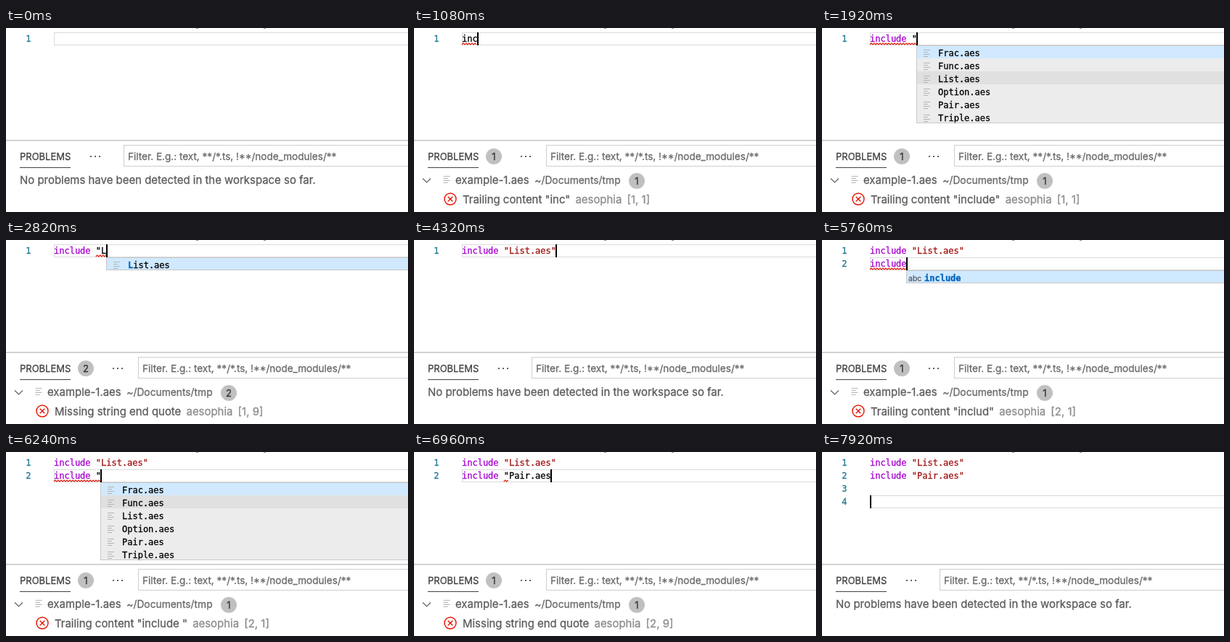
These frames come from a looping animation (554 px wide and 255 px high, 8 s). An HTML page with a canvas:

```html
<!DOCTYPE html>
<html lang="en">
<head>
<meta charset="utf-8">
<title>Editor with include completion</title>
<style>
  html, body { margin: 0; width: 100%; height: 100%; overflow: hidden; background: #fff; }
  canvas { display: block; width: 554px; height: 255px; }
</style>
</head>
<body>
<canvas id="stage"></canvas>
<script>
const WIDTH = 554, HEIGHT = 255, LOOP = 8000;
const LEFT = 66, TOP = 6, ROW = 18, CHAR = 7.22;
const MONO = '12px "DejaVu Sans Mono", monospace';
const UI = 'Inter, sans-serif';
const FILES = ['Frac.aes', 'Func.aes', 'List.aes', 'Option.aes', 'Pair.aes', 'Triple.aes'];
const FIRST = 'include "List.aes"', SECOND = 'include "Pair.aes"';

const canvas = document.getElementById('stage');
const ctx = canvas.getContext('2d');
const ratio = window.devicePixelRatio || 1;
canvas.width = WIDTH * ratio;
canvas.height = HEIGHT * ratio;

// State changes: each helper returns the part of the state it replaces.
const type = (...lines) => ({ lines });
const second = text => type(FIRST, text);
const files = typed => ({ popup: { typed, items: FILES.filter(name => name.startsWith(typed)) } });
const word = typed => ({ popup: { typed, items: ['include'], isWord: true } });
const closed = { popup: null };
const trailing = (text, line) =>
  ({ problem: `Trailing content "${text}"`, place: `[${line}, 1]`, count: 1, line, from: 0, to: 99 });
const missingQuote = line => ({ problem: 'Missing string end quote', place: `[${line}, 9]`, count: 2, line });
const onlyQuote = { count: 1, to: 9 };
const solved = { problem: null };

const events = [
  [-520, type(''), closed, solved],
  [720, type('i')],
  [780, trailing('i', 1)],
  [900, type('inc')],
  [1080, trailing('inc', 1)],
  [1140, type('incl')],
  [1200, trailing('incl', 1)],
  [1260, type('inclu')],
  [1380, trailing('inclu', 1)],
  [1440, type('includ')],
  [1500, trailing('includ', 1)],
  [1560, type('include')],
  [1680, trailing('include', 1)],
  [1800, type('include ')],
  [1920, type('include "'), files('')],
  [1980, missingQuote(1)],
  [2340, { from: 8 }],
  [2820, type('include "L'), files('L')],
  [3120, type('include "Li'), files('Li')],
  [3240, type('include "List.aes'), closed],
  [3540, onlyQuote],
  [4140, type(FIRST)],
  [4260, solved],
  [4440, second('')],
  [4740, second('i')],
  [4800, word('i')],
  [4860, trailing('i', 2)],
  [4920, second('in'), word('in')],
  [5040, trailing('in', 2)],
  [5100, second('inc'), word('inc')],
  [5160, trailing('inc', 2)],
  [5220, second('incl'), word('incl')],
  [5340, trailing('incl', 2)],
  [5400, second('inclu'), word('inclu')],
  [5460, trailing('inclu', 2)],
  [5520, second('includ'), word('includ')],
  [5580, trailing('includ', 2)],
  [5700, second('include'), word('include')],
  [5820, trailing('include', 2)],
  [5940, second('include '), closed],
  [6060, trailing('include ', 2)],
  [6180, second('include "')],
  [6240, files('')],
  [6300, missingQuote(2)],
  [6360, { from: 8 }],
  [6420, second('include "P'), files('P')],
  [6720, second('include "Pair.aes'), closed],
  [6900, onlyQuote],
  [7200, second(SECOND)],
  [7320, solved],
  [7620, type(FIRST, SECOND, '')],
  [7800, type(FIRST, SECOND, '', '')],
];

function stateAt(time) {
  const state = {};
  for (const [start, ...changes] of events) {
    if (start > time) break;
    Object.assign(state, ...changes);
    if (changes.some(change => change.lines)) state.edited = start;
  }
  return state;
}

// A hairline outline gives the glyphs a slightly heavier weight.
function text(string, x, y, color, font, align = 'left') {
  ctx.font = font;
  ctx.fillStyle = ctx.strokeStyle = color;
  ctx.lineWidth = .3;
  ctx.textAlign = align;
  ctx.fillText(string, x, y);
  ctx.strokeText(string, x, y);
  return ctx.measureText(string).width;
}

const label = (string, x, y, color = '#5c5c5c', size = 14.95, align) =>
  text(string, x, y, color, `${size}px ${UI}`, align);

function box(x, y, width, height, color) {
  ctx.fillStyle = color;
  ctx.fillRect(x, y, width, height);
}

function frame(x, y, width, height, color) {
  ctx.strokeStyle = color;
  ctx.lineWidth = 1;
  ctx.strokeRect(x + .5, y + .5, width - 1, height - 1);
}

function path(points, color, width = 1) {
  ctx.beginPath();
  points.forEach(([x, y]) => ctx.lineTo(x, y));
  ctx.strokeStyle = color;
  ctx.lineWidth = width;
  ctx.stroke();
}

function disc(x, y, radius) {
  ctx.beginPath();
  ctx.arc(x, y, radius, 0, 2 * Math.PI);
}

function badge(x, y, count) {
  disc(x, y, 11);
  ctx.fillStyle = '#c0c0c0';
  ctx.fill();
  label(count, x, y + 4.7, '#333', 13, 'center');
}

function fileIcon(x, y, color) {
  [9, 6, 9, 6].forEach((width, i) => box(x, y + i * 3, width, 1, color));
}

function drawCode(string, x, y) {
  for (const { 0: token, index } of string.matchAll(/include|"[^"]*"|[^"]+|"/g)) {
    const color = token === 'include' ? '#a600d0' : /^".*"$/.test(token) ? '#a31515' : '#000';
    text(token, x + index * CHAR, y, color, MONO);
  }
}

function drawSquiggle({ lines, line, from, to }) {
  const y = TOP + line * ROW - 2;
  const end = LEFT + Math.min(to, lines[line - 1].length) * CHAR;
  const points = [];
  for (let x = LEFT + from * CHAR, i = 0; x <= end; x += 2, i++) points.push([x, y + (i % 2 ? -1 : 1)]);
  path(points, '#e51400', 1.1);
}

function drawPopup({ typed, items, isWord }, x, y) {
  const height = items.length * ROW;
  box(x, y, WIDTH, height, '#ececec');
  items.forEach((name, i) => {
    const top = y + i * ROW;
    if (i === 0) box(x, top, WIDTH, ROW, '#d0e9ff');
    else if (top === 60) box(x, top, WIDTH, ROW, '#e0e0e0');
    const start = x + (isWord ? 25 : 30);
    const baseline = top + 14.5;
    if (isWord) label('abc', x + 3, baseline, '#616161', 10.5);
    else fileIcon(x + 10, top + 6, '#b4b4b4');
    text(typed, start, baseline, '#0066bf', 'bold ' + MONO);
    text(name.slice(typed.length), start + typed.length * CHAR, baseline, '#000', MONO);
  });
  frame(x, y, WIDTH, height, '#c8c8c8');
}

function drawEditor(state, time) {
  const { lines } = state;
  const top = TOP + (lines.length - 1) * ROW;
  const caret = Math.floor(LEFT + lines[lines.length - 1].length * CHAR);
  for (const x of [262, 355]) box(x, 0, 3, 1, '#8a8a8a');
  frame(LEFT, top, WIDTH, ROW, '#dadada');
  lines.forEach((string, i) => {
    const baseline = TOP + i * ROW + 13;
    text(i + 1, 34.5, baseline, '#237893', MONO, 'right');
    drawCode(string, LEFT, baseline);
  });
  if (state.problem) drawSquiggle(state);
  if ((time - state.edited) % 1000 < 500) box(caret, top, 2, ROW, '#000');
  if (state.popup) drawPopup(state.popup, caret, top + ROW);
}

function drawProblem({ problem, place, count }) {
  badge(110, 178, count);
  path([[12, 208.5], [17.5, 214], [23, 208.5]], '#616161', 1.2);
  fileIcon(40.5, 205, '#b4b4b4');
  label('example-1.aes', 57, 216);
  label('~/Documents/tmp', 166.3, 216, '#6a6a6a', 13.8);
  badge(307, 212, count);

  disc(50, 237, 8);
  ctx.strokeStyle = '#e51400';
  ctx.lineWidth = 1.4;
  ctx.stroke();
  path([[46.8, 233.8], [53.2, 240.2]], '#e51400', 1.4);
  path([[46.8, 240.2], [53.2, 233.8]], '#e51400', 1.4);

  let x = 67;
  x += label(problem, x, 243) + 7.2;
  x += label('aesophia', x, 243, '#8c8c8c') + 7.2;
  label(place, x, 243, '#8c8c8c');
}

function drawPanel(state) {
  const shift = state.problem ? 20 : 0;
  const dots = state.problem ? 147 : 116;
  box(0, 155, WIDTH, 1.5, '#c6c6c6');
  label('PROBLEMS', 19, 182.5, '#424242', 13);
  box(19, 193, 70, 1, '#424242');
  for (let i = 0; i < 3; i++) box(dots + i * 6, 177, 2, 2, '#616161');
  frame(162 + shift, 162, WIDTH, 30, '#cecece');
  label('Filter. E.g.: text, **/*.ts, !**/node_modules/**', 168 + shift, 183, '#6a6a6a', 13.55);
  if (state.problem) drawProblem(state);
  else label('No problems have been detected in the workspace so far.', 19, 216);
}

const begin = performance.now();

function draw() {
  const time = (performance.now() - begin) % LOOP;
  const state = stateAt(time);
  ctx.setTransform(ratio, 0, 0, ratio, 0, 0);
  box(0, 0, WIDTH, HEIGHT, '#fff');
  drawPanel(state);
  drawEditor(state, time);
  requestAnimationFrame(draw);
}
draw();
</script>
</body>
</html>
```
